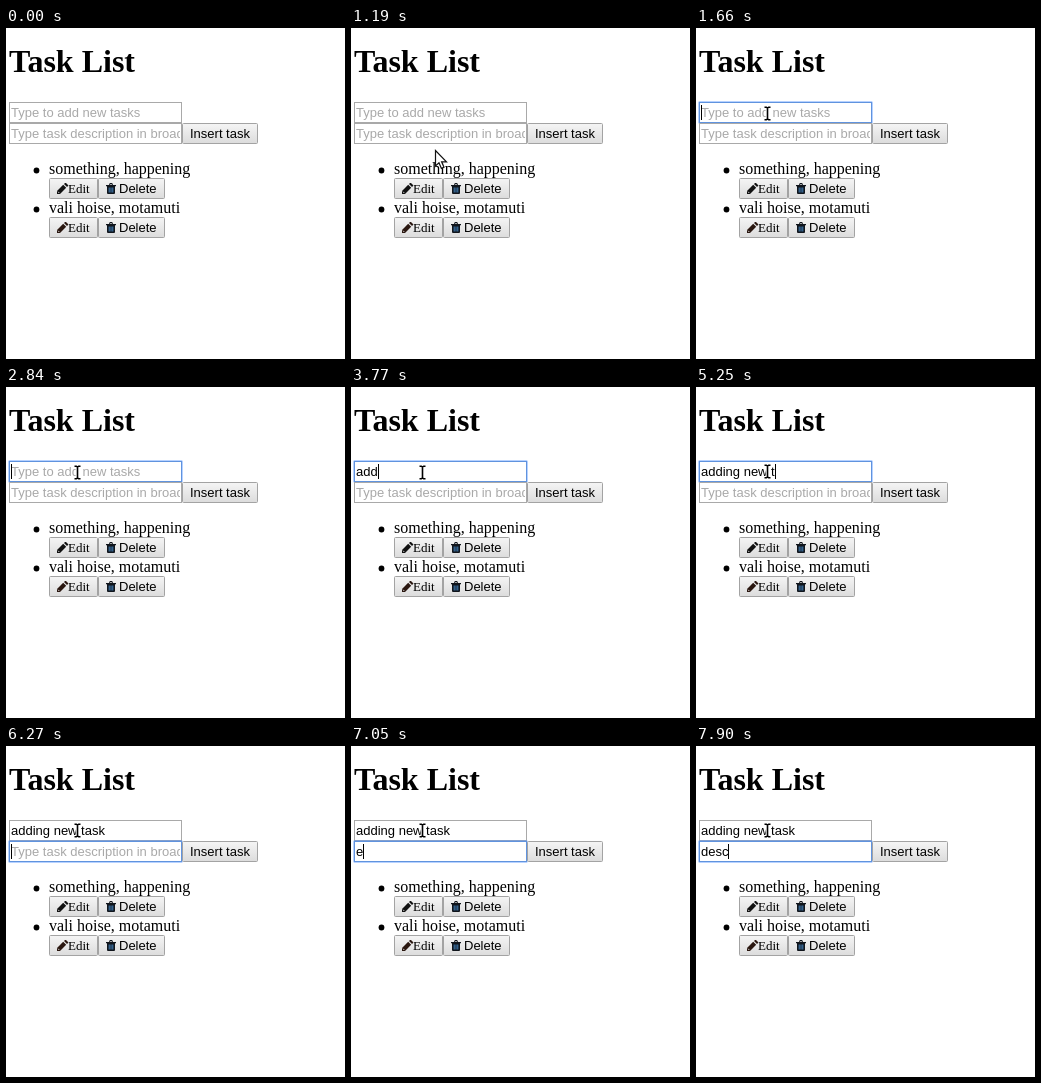
Write an HTML page that moves like this. It is 339 px wide and 331 px high and loops after 8 s.

```html
<!DOCTYPE html>
<html lang="en">
<head>
<meta charset="utf-8">
<title>Task List</title>
<style>
  html, body { margin: 0; width: 100%; height: 100%; overflow: hidden; background: #fff; }
  svg { display: block; width: 339px; height: 331px; }
  text { white-space: pre; }
  .serif { font-family: "Liberation Serif", "Times New Roman", serif; font-size: 16px; }
  .sans { font-family: "Liberation Sans", Arial, sans-serif; font-size: 13px; }
  h1, .title { font-size: 32px; font-weight: bold; }
  .small { font-size: 13px; }
  .box { fill: #fff; stroke: #a9a9a9; }
  .glow { fill: none; stroke: #4d90fe; stroke-opacity: .4; visibility: hidden; }
  .focus .box { stroke: #6093de; }
  .focus .glow { visibility: visible; }
  .hint { fill: #a9a9a9; }
  .button { fill: url(#face); stroke: #a3a3a3; }
</style>
</head>
<body>
<svg viewBox="0 0 339 331">
  <defs>
    <linearGradient id="face" x1="0" y1="0" x2="0" y2="1">
      <stop offset="0" stop-color="#f5f5f5"/>
      <stop offset="1" stop-color="#dcdcdc"/>
    </linearGradient>
    <clipPath id="inside"><rect x="5" y="70" width="169" height="50"/></clipPath>
    <g id="pencil">
      <path d="M0 11V8L6.2 1.8 9.2 4.8 3 11Z"/>
      <path d="M7 1 8 0H9L11 2V3L10 4Z"/>
      <path d="M1 8.7 2.3 10" stroke="#fff" stroke-width=".8"/>
    </g>
    <g id="trash">
      <path d="M0 2H3L3.8 0H6.2L7 2H10V3.2H0Z M4.2 2H5.8L5.5 1H4.5Z" fill-rule="evenodd"/>
      <path d="M1 3H9V10Q9 11 8 11H2Q1 11 1 10Z"/>
      <path d="M3.2 4.5V9.5M5 4.5V9.5M6.8 4.5V9.5" stroke="#4a8fd0" stroke-width=".9"/>
    </g>
  </defs>
  <text class="serif title" x="3" y="44">Task List</text>
  <g id="page"></g>
  <g id="arrow">
    <path d="M.5 .5V16L4 12.8 6.4 18.4 9 17.3 6.6 11.8H11.5Z" fill="#fff" stroke="#111" stroke-width="1.2"/>
  </g>
  <g id="beam" fill="none">
    <path d="M-2.8 -6.3H-1.2L0 -5.3 1.2 -6.3H2.8M0 -5.3V5.3M-2.8 6.3H-1.2L0 5.3 1.2 6.3H2.8" stroke="#fff" stroke-width="3.6"/>
    <path d="M-3 -6.3H-1.2L0 -5.3 1.2 -6.3H3M0 -5.3V5.3M-3 6.3H-1.2L0 5.3 1.2 6.3H3" stroke="#000" stroke-width="1.6"/>
  </g>
</svg>
<script>
const LOOP = 8000;
const $ = id => document.getElementById(id);

const field = (id, y) => `<g id="${id}">
  <rect class="box" x="3.5" y="${y + .5}" width="172" height="20"/>
  <rect class="glow" x="2.5" y="${y - .5}" width="174" height="22" rx="1"/>
  <text class="sans" x="5" y="${y + 15}" clip-path="url(#inside)"></text>
  <rect class="caret" y="${y + 3}" width="1" height="15"/>
</g>`;

const button = (x, y, w) =>
  `<rect class="button" x="${x + .5}" y="${y + .5}" width="${w - 1}" height="20" rx="1"/>`;

const item = (label, y, tint) => `
  <circle cx="30.5" cy="${y - 3.5}" r="2.9"/>
  <text class="serif" x="43" y="${y}">${label}</text>
  ${button(43, y + 4, 49)}${button(92, y + 4, 67)}
  <use href="#pencil" x="51" y="${y + 9}" fill="${tint}"/>
  <text class="serif small" x="62" y="${y + 19}">Edit</text>
  <use href="#trash" x="100" y="${y + 9}" fill="#10151c"/>
  <text class="sans" x="113" y="${y + 19}">Delete</text>`;

$("page").innerHTML =
  field("name", 74) + field("about", 95) +
  button(176, 95, 76) + '<text class="sans" x="184" y="110">Insert task</text>' +
  item("something, happening", 146, "#111") + item("vali hoise, motamuti", 185, "#2a1710");

const hints = { name: "Type to add new tasks", about: "Type task description in broad" };

// time, focused field, its text, caret shown
const steps = [
  [0, "", "", 0], [1660, "name", "", 1], [2210, "name", "", 0], [2840, "name", "", 1]
];
const task = "adding new task";
[3370, 3600, 3770, 4080, 4230, 4380, 4550, 4700, 4780, 4850, 5010, 5250, 5400, 5570, 5720]
  .forEach((t, i) => steps.push([t, "name", task.slice(0, i + 1), 1]));
steps.push([6270, "about", "", 1], [6880, "about", "", 0], [7050, "about", "e", 1], [7360, "about", "", 1]);
[7430, 7600, 7750, 7900].forEach((t, i) => steps.push([t, "about", "desc".slice(0, i + 1), 1]));

// time, pointer shape, x, y
const pointer = [
  [0, "", 0, 0], [960, "arrow", 258, 228], [1040, "arrow", 190, 186], [1110, "arrow", 124, 150],
  [1190, "arrow", 84, 122], [1280, "arrow", 76, 104], [1350, "beam", 72, 90],
  [1430, "beam", 71, 85.5], [5100, "beam", 71, 84.5]
];

const pen = document.createElement("canvas").getContext("2d");
pen.font = '13px "Liberation Sans", Arial, sans-serif';
const caretX = s => Math.round(4.95 + pen.measureText(s).width);
const at = (list, t) => list.findLast(row => row[0] <= t);

function showField(id, value, focused, caret) {
  const g = $(id), label = g.querySelector("text"), bar = g.querySelector(".caret");
  g.setAttribute("class", focused ? "focus" : "");
  label.textContent = value || hints[id];
  label.setAttribute("class", value ? "sans" : "sans hint");
  bar.setAttribute("x", caretX(value));
  bar.setAttribute("visibility", focused && caret ? "visible" : "hidden");
}

function draw(t) {
  const [, focus, value, caret] = at(steps, t);
  const first = focus === "about" ? task : value;
  showField("name", first, focus === "name", caret);
  showField("about", focus === "about" ? value : "", focus === "about", caret);

  const [, shape, x, y] = at(pointer, t);
  for (const id of ["arrow", "beam"]) {
    $(id).setAttribute("visibility", id === shape ? "visible" : "hidden");
    $(id).setAttribute("transform", `translate(${x + (id === "beam" ? .5 : 0)} ${y})`);
  }
}

const start = performance.now();
function tick() {
  draw((performance.now() - start) % LOOP);
  requestAnimationFrame(tick);
}
tick();
</script>
</body>
</html>
```
